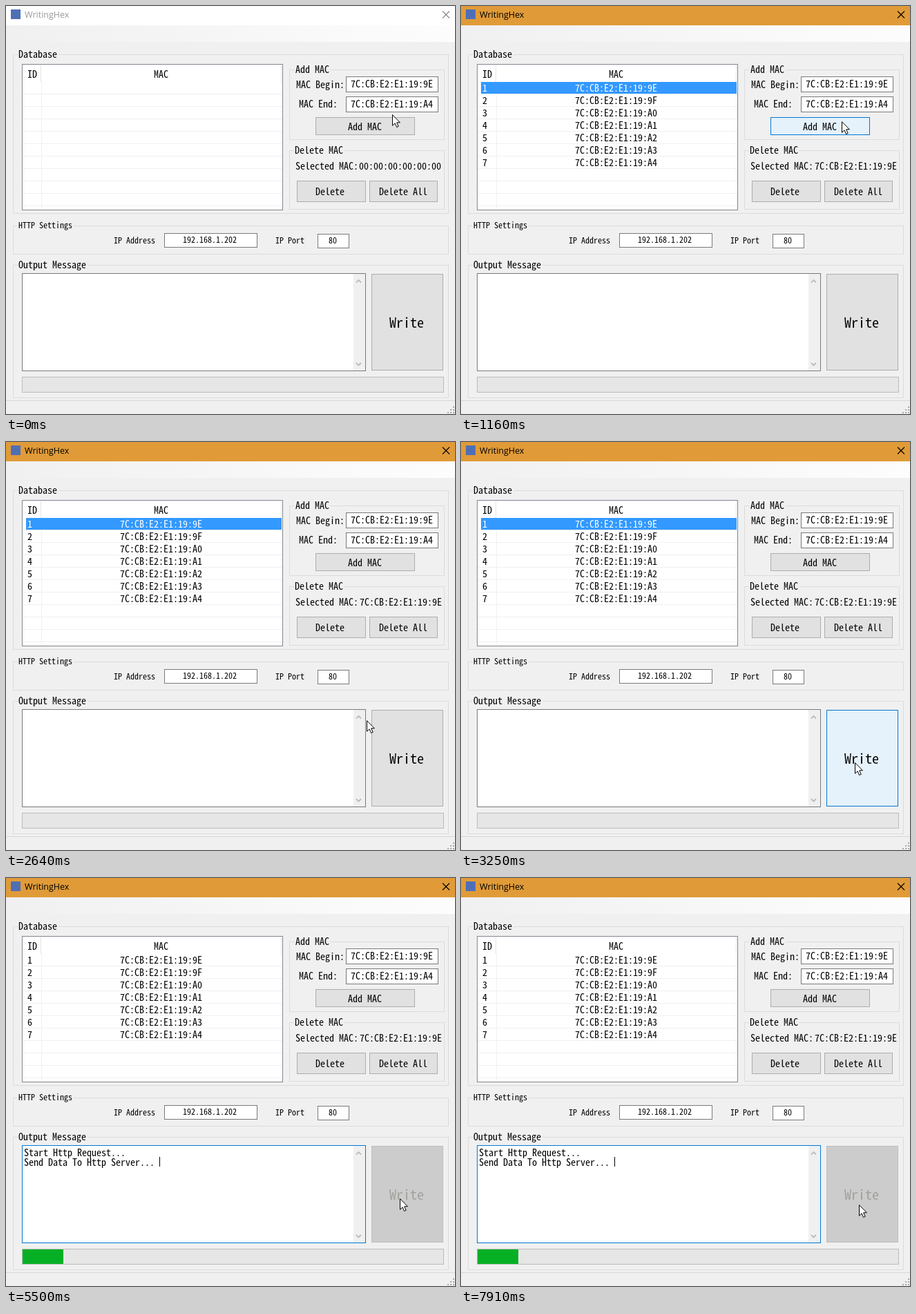
Write an HTML page that moves like this. It is 650 by 591 pixels and loops after 8000 ms.

```html
<!DOCTYPE html>
<html lang="en">
<head>
<meta charset="utf-8">
<title>WritingHex</title>
<style>
html, body { margin: 0; width: 100%; height: 100%; overflow: hidden; background: #f0f0f0; }
svg { display: block; width: 650px; height: 591px; }
text { font-family: 'Noto Sans Mono CJK SC', 'Liberation Mono', monospace; white-space: pre; }
.title { font-family: 'Open Sans', 'Noto Sans', sans-serif; }
</style>
</head>
<body>
<svg id="stage" viewBox="0 0 650 591"></svg>
<script>
const LOOP = 8000;
const stage = document.getElementById('stage');

function add(tag, attrs, parent = stage) {
  const el = document.createElementNS('http://www.w3.org/2000/svg', tag);
  set(el, attrs);
  parent.append(el);
  return el;
}
function set(el, attrs) {
  for (const key in attrs) el.setAttribute(key, attrs[key]);
}
const fill = (x, y, width, height, color, parent) =>
  add('rect', { x, y, width, height, fill: color }, parent);

// Pixel-aligned outlined box; right and bottom edges are exclusive.
const box = (x, y, right, bottom, color, line) =>
  add('rect', { x: x + .5, y: y + .5, width: right - x - 1, height: bottom - y - 1, fill: color, stroke: line });

// Text is placed by its left edge and the middle of its capitals.
function label(str, x, mid, size = 14, parent = stage) {
  const el = add('text', { x, y: mid + size * .36, 'font-size': size, fill: '#000' }, parent);
  el.textContent = str;
  return el;
}
function group(name, x, y, right, bottom, textX, size = 14) {
  box(x, y, right, bottom, 'none', '#dcdcdc');
  fill(textX - 1, y - 2, name.length * size / 2 + 3, 5, '#f0f0f0');
  label(name, textX, y, size);
}
function field(str, x, y, right, bottom, textX, size = 14) {
  box(x, y, right, bottom, '#fff', '#7a7a7a');
  label(str, textX, (y + bottom) / 2 - .5, size);
}
function button(str, x, y, right, bottom, textX, size = 14) {
  const face = box(x, y, right, bottom, '#e1e1e1', '#adadad');
  const text = label(str, textX, (y + bottom) / 2 + .5, size);
  return { face, text, holds: (px, py) => px >= x && px < right && py >= y && py < bottom };
}

fill(0, 0, 650, 591, '#f0f0f0');

// Title bar and menu strip
const bar = fill(0, 0, 650, 28, '#fff');
fill(7, 5, 14, 14, '#4f6fb5');
const title = add('text', { x: 27, y: 17, 'font-size': 12.5, class: 'title' });
title.textContent = 'WritingHex';
const cross = add('path', { d: 'M632 7.5l10 10m0-10l-10 10', fill: 'none', 'stroke-width': 1.1 });
const grad = add('linearGradient', { id: 'strip' }, add('defs', {}));
add('stop', { offset: 0, 'stop-color': '#f0f0f0' }, grad);
add('stop', { offset: 1, 'stop-color': '#fdfdfd' }, grad);
fill(0, 28, 650, 24, 'url(#strip)');

// Table
group('Database', 10, 70, 641, 301, 18);
box(23, 84, 401, 296, '#fff', '#828790');
fill(50, 85, 1, 25, '#e5e5e5');
fill(398, 85, 1, 25, '#e5e5e5');
fill(51, 110, 1, 185, '#f0f0f0');
for (let y = 127; y < 295; y += 18) fill(24, y, 376, 1, '#f0f0f0');
label('ID', 31, 99);
label('MAC', 214, 99);

const mac = n => '7C:CB:E2:E1:19:' + n.toString(16).toUpperCase();
const rows = add('g', {});
const mark = fill(29, 110, 370, 17, '#3399ff', rows);
const cells = [];
for (let i = 0; i < 7; i++) {
  const mid = 119 + i * 18;
  cells.push([label(i + 1, 31, mid, 14, rows), label(mac(0x9e + i), 165, mid, 14, rows)]);
}

// Right-hand panels
group('Add MAC', 410, 92, 635, 194, 419);
label('MAC Begin:', 420, 114);
field(mac(0x9e), 492, 102, 626, 125, 499);
label('MAC End:', 424, 142);
field(mac(0xa4), 492, 131, 626, 154, 499);
const addBtn = button('Add MAC', 448, 161, 592, 187, 495);
group('Delete MAC', 410, 209, 635, 295, 418);
label('Selected MAC:', 419, 231.5);
const chosen = label('', 511, 231.5);
button('Delete', 421, 253, 521, 284, 448);
button('Delete All', 526, 253, 625, 284, 540);

group('HTTP Settings', 10, 318, 641, 360, 18, 12);
label('IP Address', 156, 340, 12);
field('192.168.1.202', 229, 329, 364, 350, 256, 12);
label('IP Port', 390, 340, 12);
field('80', 451, 330, 497, 351, 467, 12);

// Output
group('Output Message', 10, 375, 641, 568, 18);
const output = box(23, 387, 521, 529, '#fff', '#7a7a7a');
fill(503, 388, 17, 140, '#f0f0f0');
add('path', { d: 'M507 400.5l3.5-3.5 3.5 3.5M507 517l3.5 3.5 3.5-3.5', fill: 'none', stroke: '#bbb', 'stroke-width': 1.8 });
const log = add('g', {});
label('Start Http Request...', 26, 398, 14, log);
label('Send Data To Http Server...', 26, 412, 14, log);
const caret = fill(222, 404, 1, 14, '#000');
const writeBtn = button('Write', 529, 388, 633, 528, 555, 20);
box(23, 537, 634, 560, '#e6e6e6', '#bcbcbc');
const progress = fill(24, 538, 59, 21, '#06b025');

// Status bar and size grip
fill(0, 571, 650, 1, '#d7d7d7');
for (let r = 0; r < 3; r++)
  for (let c = 2 - r; c < 3; c++) fill(639 + c * 4, 580 + r * 4, 2, 2, '#a8a8a8');

const pointer = add('path', {
  d: 'M.5 .7V16.2L4.1 12.8 6.6 18.5 9.2 17.4 6.7 11.8H11.4Z',
  fill: '#fff', stroke: '#000', 'stroke-width': 1
});

// Pointer moves: start, end, number of steps, target x and y
const START = [559, 157];
const moves = [
  [80, 310, 4, 551, 167],
  [1710, 2010, 5, 316, 283],
  [2180, 2410, 4, 508, 385],
  [2640, 3020, 6, 570, 464],
  [7610, 7910, 5, 576, 473]
];
function pointerAt(t) {
  let [x, y] = START;
  for (const [from, to, steps, tx, ty] of moves) {
    if (t < from) break;
    const gap = (to - from) / (steps - 1);
    const p = Math.min(1, (Math.floor((t - from) / gap + .01) + 1) / steps);
    const e = p + .4 * p * (1 - p);
    x += (tx - x) * e;
    y += (ty - y) * e;
  }
  return [Math.round(x), Math.round(y)];
}

const looks = {
  plain: ['#e1e1e1', '#adadad', '#000'],
  hover: ['#e5f1fb', '#0078d7', '#000'],
  down: ['#cce4f7', '#005499', '#000'],
  off: ['#cccccc', '#bfbfbf', '#a0a09c']
};
function paint(btn, look) {
  const [face, line, ink] = looks[look];
  set(btn.face, { fill: face, stroke: line });
  set(btn.text, { fill: ink });
}
const show = (el, on) => set(el, { visibility: on ? 'visible' : 'hidden' });
const blinks = [3940, 4490, 5040, 5500, 6050, 6600, 7130, 7610];

function draw(t) {
  const active = t >= 620, filled = t >= 1160, sent = t >= 3410;
  const [x, y] = pointerAt(t);
  set(pointer, { transform: `translate(${x} ${y})` });

  set(bar, { fill: active ? '#e09b38' : '#fff' });
  set(title, { fill: active ? '#000' : '#999' });
  set(cross, { stroke: active ? '#000' : '#888' });

  show(rows, filled);
  set(mark, { opacity: sent ? 0 : 1 });
  for (const cell of cells[0]) set(cell, { fill: sent ? '#000' : '#fff' });
  chosen.textContent = filled ? mac(0x9e) : '00:00:00:00:00:00';
  set(chosen, { x: filled ? 512 : 511 });

  const state = (btn, from, to) =>
    t >= from && t < to ? 'down' : btn.holds(x, y) ? 'hover' : 'plain';
  paint(addBtn, state(addBtn, 620, 700));
  paint(writeBtn, sent ? 'off' : state(writeBtn, 3330, 3410));

  show(log, sent);
  show(progress, sent);
  set(output, { stroke: sent ? '#0078d7' : '#7a7a7a' });
  show(caret, sent && blinks.filter(b => b <= t).length % 2 === 0);
}

const begin = performance.now();
function tick(now) {
  draw(Math.max(0, now - begin) % LOOP);
  requestAnimationFrame(tick);
}
draw(0);
requestAnimationFrame(tick);
</script>
</body>
</html>
```
